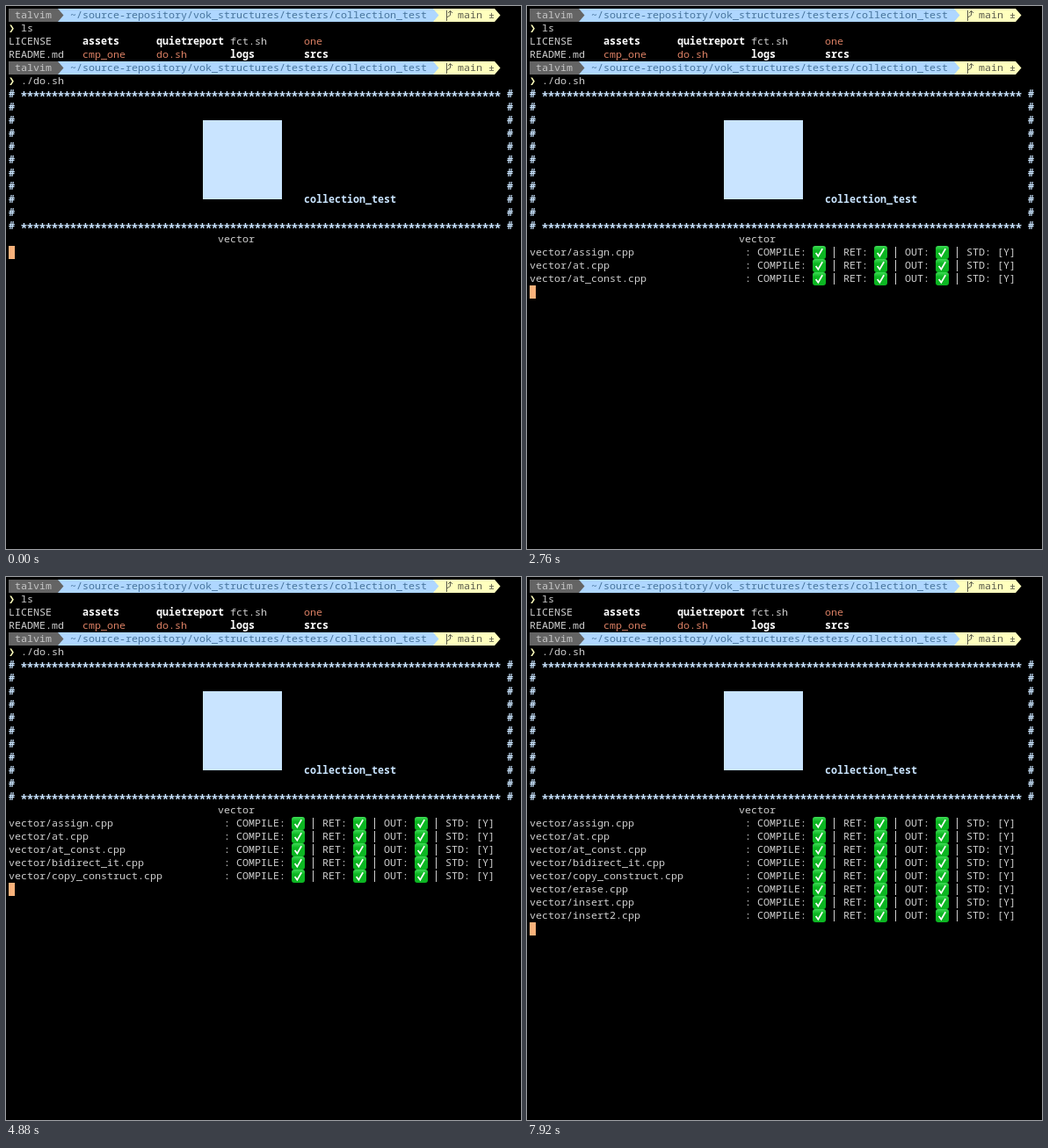
These frames come from a looping animation (586 by 618 pixels, 8 s). An HTML page with a canvas:

```html
<!DOCTYPE html>
<html lang="en">
<head>
<meta charset="utf-8">
<title>Terminal test run</title>
<style>
  html, body { margin: 0; width: 100%; height: 100%; overflow: hidden; background: #000; }
  canvas { display: block; }
</style>
</head>
<body>
<canvas id="stage" width="586" height="618"></canvas>
<script>
const ctx = document.getElementById('stage').getContext('2d');
const LOOP = 8000;
const CELL = 7, LINE = 15, LEFT = 3, TOP = 3, BASE = 11;
const SIZE = 11.667, STAR_SIZE = 14;
const FAMILY = '"Noto Sans Mono", "DejaVu Sans Mono", monospace';

const color = {
  text: '#cfcfcf', bright: '#ffffff', banner: '#c9e4ff', script: '#dc8064',
  user: '#646464', userText: '#c6c6c6', path: '#afd7ff', pathText: '#47749c',
  branch: '#ffffbe', branchText: '#5c5c4c', cursor: '#fab27b',
  checkTop: '#3ddc55', check: '#0cb622'
};

const tests = [
  [680, 'assign'], [1720, 'at'], [2720, 'at_const'], [3840, 'bidirect_it'],
  [4800, 'copy_construct'], [5840, 'erase'], [6880, 'insert'], [7920, 'insert2']
];
const FIRST_ROW = 18;

const colX = col => LEFT + col * CELL;
const rowY = row => TOP + row * LINE;

// Every glyph sits centred in a cell of the terminal's character grid.
function write(row, col, text, fill = color.text, bold = false, size = SIZE, shift = 0) {
  ctx.font = `${bold ? 'bold ' : ''}${size}px ${FAMILY}`;
  ctx.fillStyle = fill;
  ctx.textAlign = 'center';
  [...text].forEach((ch, i) => {
    if (ch !== ' ') ctx.fillText(ch, colX(col + i) + CELL / 2, rowY(row) + BASE + shift);
  });
}

function block(row, from, to, fill) {
  ctx.fillStyle = fill;
  ctx.fillRect(colX(from), rowY(row), (to - from) * CELL, LINE);
}

function arrow(row, col, fill) {
  const x = colX(col), y = rowY(row);
  ctx.fillStyle = fill;
  ctx.beginPath();
  ctx.moveTo(x, y);
  ctx.lineTo(x + CELL - 0.5, y + LINE / 2);
  ctx.lineTo(x, y + LINE);
  ctx.fill();
}

function stroke(points, style, width) {
  ctx.strokeStyle = style;
  ctx.lineWidth = width;
  ctx.beginPath();
  points.forEach(([x, y]) => ctx.lineTo(x, y));
  ctx.stroke();
}

function branchIcon(row, col) {
  const x = colX(col), y = rowY(row);
  stroke([[x + 1.5, y + 2], [x + 1.5, y + 14]], color.branchText, 1);
  stroke([[x + 1.5, y + 10], [x + 5.5, y + 7.5], [x + 5.5, y + 3]], color.branchText, 1);
  stroke([[x + 3, y + 5], [x + 5.5, y + 2.5], [x + 8, y + 5]], color.branchText, 1);
}

function prompt(row, command) {
  block(row, 0, 8, color.user);
  block(row, 8, 69, color.path);
  block(row, 69, 79, color.branch);
  arrow(row, 8, color.user);
  arrow(row, 69, color.path);
  arrow(row, 79, color.branch);
  write(row, 1, 'talvim', color.userText);
  write(row, 10, '~/source-repository/vok_structures/testers/collection_test', color.pathText);
  branchIcon(row, 71);
  write(row, 73, 'main ±', color.branchText);
  write(row + 1, 0, '❯', color.branch);
  write(row + 1, 2, command);
}

function listing() {
  write(2, 0, 'LICENSE');
  write(2, 12, 'assets', color.bright, true);
  write(2, 24, 'quietreport', color.bright, true);
  write(2, 36, 'fct.sh');
  write(2, 48, 'one', color.script);
  write(3, 0, 'README.md');
  write(3, 12, 'cmp_one', color.script);
  write(3, 24, 'do.sh', color.script);
  write(3, 36, 'logs', color.bright, true);
  write(3, 48, 'srcs', color.bright, true);
}

function banner() {
  for (let row = 6; row <= 16; row++) {
    write(row, 0, '#', color.banner, true);
    write(row, 81, '#', color.banner, true);
  }
  for (const row of [6, 16]) {
    write(row, 2, '*'.repeat(78), color.banner, true, STAR_SIZE, 4);
  }
  ctx.fillStyle = color.banner;
  ctx.fillRect(224, 130, 90, 90);
  write(14, 48, 'collection_test', color.banner, true);
  write(17, 34, 'vector');
}

function checkMark(row, col) {
  const x = colX(col), y = rowY(row);
  const shade = ctx.createLinearGradient(0, y, 0, y + LINE);
  shade.addColorStop(0, color.checkTop);
  shade.addColorStop(0.35, color.check);
  shade.addColorStop(1, color.check);
  ctx.fillStyle = shade;
  ctx.beginPath();
  ctx.roundRect(x, y, 15, 15, 3);
  ctx.fill();
  stroke([[x + 3.6, y + 8], [x + 6.3, y + 11.6], [x + 11.2, y + 3.2]], '#fff', 1.7);
}

function divider(row, col) {
  const x = colX(col) + 3.5, y = rowY(row);
  stroke([[x, y + 1], [x, y + 14]], color.text, 1);
}

function result(row, name) {
  write(row, 0, `vector/${name}.cpp`);
  write(row, 35, ': COMPILE:');
  write(row, 51, 'RET:');
  write(row, 61, 'OUT:');
  write(row, 71, 'STD: [Y]');
  for (const col of [46, 56, 66]) {
    checkMark(row, col);
    divider(row, col + 3);
  }
}

function draw(time) {
  ctx.fillStyle = '#000';
  ctx.fillRect(0, 0, 586, 618);
  prompt(0, 'ls');
  listing();
  prompt(4, './do.sh');
  banner();
  const done = tests.filter(([start]) => time >= start);
  done.forEach(([, name], i) => result(FIRST_ROW + i, name));
  block(FIRST_ROW + done.length, 0, 1, color.cursor);
}

const began = performance.now();
function tick() {
  draw((performance.now() - began) % LOOP);
  requestAnimationFrame(tick);
}
tick();
</script>
</body>
</html>
```
